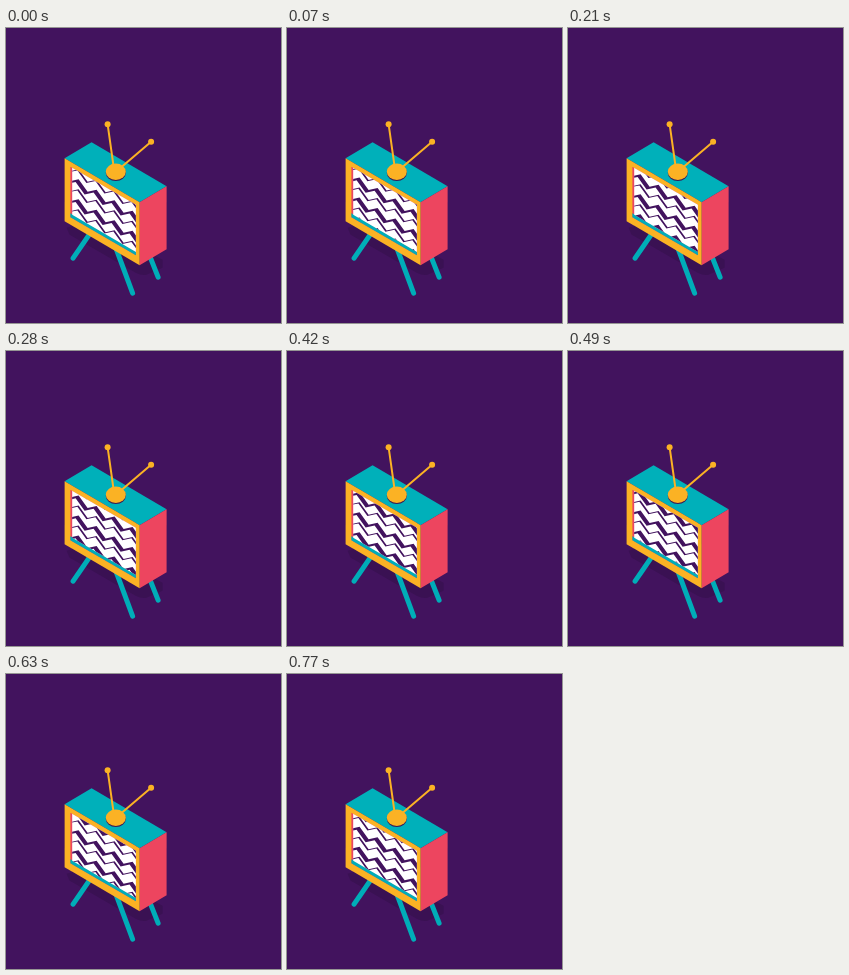
Animation, 275 px wide and 295 px high, one loop 840 ms. Source, as an HTML page:

```html
<!DOCTYPE html>
<html lang="en">
<head>
<meta charset="utf-8">
<title>Retro TV</title>
<style>
  html, body { margin: 0; width: 100%; height: 100%; overflow: hidden; background: #42135e; }
  svg { display: block; width: 100vw; height: 100vh; }
</style>
</head>
<body>
<svg viewBox="0 0 275 295">
  <defs>
    <clipPath id="glass"><path d="M64.8 139L130.3 177V227.5L64.8 189.5Z"/></clipPath>
    <clipPath id="pane"><path d="M66.6 138L131 175.5V224.7L66.6 187Z"/></clipPath>
  </defs>

  <g transform="translate(-.4 -.3)">
    <path d="M61 200L86 193L157 232V240L141 247Q136 248 130 245L64 207Z" fill="#3a1153"/>

    <path d="M85 205L67.5 230.5M109 217L127 265.5M144 228L152.5 249.5"
          stroke="#00adb8" stroke-width="5" stroke-linecap="round"/>

    <path d="M59 130.5L86 114.5L161 158.5L134 174.5Z" fill="#00b0ba"/>
    <path d="M134 174.5L161 158.5V221.5L134 237.5Z" fill="#ed455f"/>
    <path d="M59 130.5L134 174.5V237.5L59 193.5Z" fill="#fbb224"/>

    <g clip-path="url(#glass)">
      <path d="M64 137H132V230H64Z" fill="#ed455f"/>
      <path d="M64 185L132 225V232L64 192Z" fill="#00adb8"/>
      <g clip-path="url(#pane)">
        <path d="M64 137H132V230H64Z" fill="#fff"/>
        <g id="waves" fill="#42135e"></g>
      </g>
    </g>

    <ellipse cx="110.2" cy="145.2" rx="10" ry="8.2" fill="#3b1a55"/>
    <ellipse cx="110.2" cy="144.1" rx="10" ry="8.2" fill="#fbb224"/>
    <path d="M102 96.5L108 139M145.5 114L115 140"
          stroke="#fbb224" stroke-width="2" stroke-linecap="round"/>
    <g fill="#fbb224">
      <circle cx="102" cy="96.5" r="3"/>
      <circle cx="145.5" cy="114" r="3"/>
    </g>
  </g>
</svg>
<script>
  const STEP = 70, STEPS = 12, GAP = 20;
  const PERIOD = 18, DROP = 10.5, FALL = 12.5;
  const waves = document.getElementById('waves');

  // A ribbon between a zigzag and its copy shifted by (dx, dy).
  function ribbon(y, dx, dy) {
    const top = [];
    for (let k = -2; k < 6; k++) {
      const px = 73 + k * PERIOD, py = y + k * DROP;
      top.push([px, py], [px + PERIOD / 2, py + FALL]);
    }
    const low = top.map(([a, b]) => [a + dx, b + dy]).reverse();
    const path = document.createElementNS('http://www.w3.org/2000/svg', 'path');
    path.setAttribute('d', 'M' + [...top, ...low].map(p => p.join(' ')).join('L') + 'Z');
    waves.append(path);
  }

  for (let row = -2; row < 5; row++) {
    const y = 151.5 + row * GAP;
    ribbon(y, -3, 2.8);
    ribbon(y + GAP / 2, -1.2, 1.2);
  }

  function draw(now) {
    const step = Math.floor(now / STEP) % STEPS;
    waves.setAttribute('transform', `translate(0 ${-step * GAP / STEPS})`);
    requestAnimationFrame(draw);
  }
  draw(0);
</script>
</body>
</html>
```
